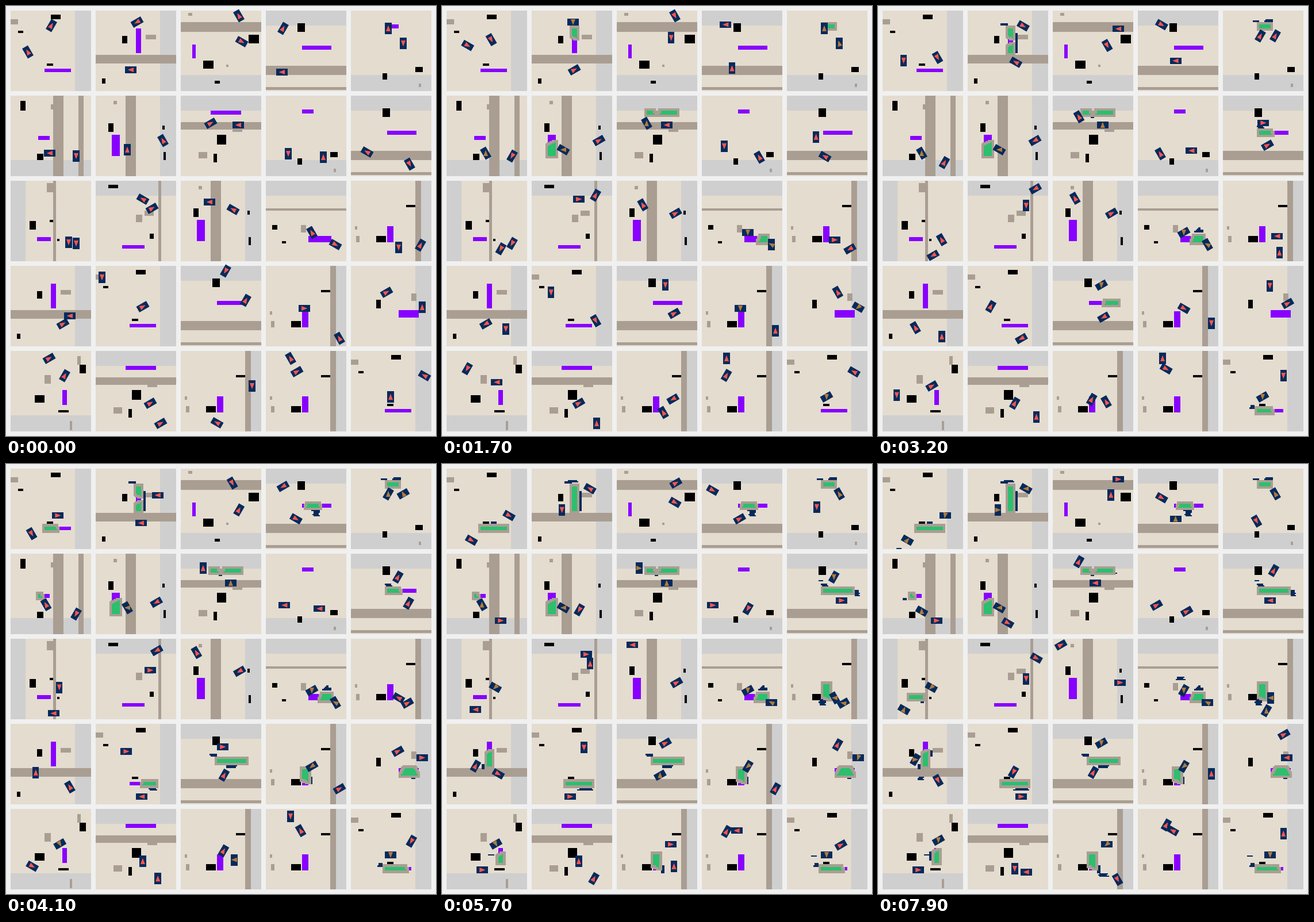
Recreate the animation shown at these times as a matplotlib script. Size 748 px wide and 748 px high, loop 8 s.

```python
import numpy as np
import matplotlib.pyplot as plt
from matplotlib.animation import FuncAnimation
from matplotlib.colors import to_rgb
from matplotlib.patches import Polygon

STAGE, SIDE, GAP, CELLS = 748, 140, 8, 64
CELL = SIDE / CELLS
FRAMES, STEP_MS = 80, 100
BEAT = FRAMES / 6
HOP = 6 * CELL
REACH = 28

FLOOR, GREY, TAN, INK, GOAL = "#e4dccf", "#cfcfcf", "#aa9e93", "#000000", "#8800ff"
NAVY, GREEN, RED, RUST = "#042a5b", "#2bbf6e", "#f9564f", "#b37a3c"

right = (GREY, 51, 0, 64, 64)
bottom = (GREY, 0, 51, 64, 64)
top = (GREY, 0, 0, 64, 12)
left = (GREY, 0, 0, 12, 64)

# Scenes: (colour, x0, y0, x1, y1) in cells, painted in order, goal bar last
shelf = [right, (TAN, 0, 7, 6, 11), (INK, 6, 16, 10, 18), (INK, 32, 3, 40, 7),
         (INK, 29, 42, 34, 44), (GOAL, 27, 46, 48, 49)]
tower = [right, (TAN, 0, 35, 64, 42), (INK, 21, 20, 25, 26), (TAN, 40, 19, 48, 23),
         (INK, 5, 54, 8, 58), (GOAL, 32, 14, 36, 34)]
depot = [bottom, (TAN, 0, 9, 64, 17), (TAN, 6, 2, 9, 4), (INK, 54, 19, 62, 26),
         (INK, 18, 40, 26, 46), (TAN, 36, 43, 38, 45), (INK, 27, 56, 31, 58),
         (GOAL, 9, 27, 12, 38)]
lane = [top, (TAN, 0, 44, 64, 51), (TAN, 0, 61, 64, 63), (INK, 25, 10, 31, 17),
        (GOAL, 29, 28, 52, 31)]
hall = [bottom, (INK, 51, 45, 57, 49), (INK, 25, 50, 29, 55), (TAN, 54, 58, 56, 61),
        (GOAL, 29, 11, 38, 14)]
twin = [bottom, (TAN, 34, 0, 42, 64), (TAN, 54, 0, 58, 64), (INK, 8, 4, 12, 12),
        (TAN, 32, 7, 34, 11), (INK, 21, 46, 26, 51), (GOAL, 22, 32, 31, 35)]
aisle = [right, (TAN, 24, 0, 32, 64), (TAN, 14, 4, 17, 7), (INK, 10, 22, 14, 29),
         (INK, 53, 24, 55, 27), (INK, 54, 45, 56, 51), (GOAL, 13, 31, 19, 48)]
rail = [top, (TAN, 0, 21, 64, 27), (TAN, 41, 27, 49, 29), (INK, 29, 31, 36, 39),
        (TAN, 14, 45, 21, 50), (INK, 26, 46, 29, 53), (GOAL, 24, 12, 48, 15)]
west = [left, (TAN, 34, 0, 36, 64), (TAN, 29, 2, 34, 9), (INK, 15, 32, 20, 39),
        (INK, 31, 31, 34, 33), (INK, 37, 46, 39, 48), (GOAL, 21, 45, 32, 48)]
loft = [top, (TAN, 50, 0, 52, 64), (INK, 10, 3, 18, 6), (TAN, 39, 24, 46, 28),
        (TAN, 32, 27, 37, 33), (INK, 43, 42, 46, 46), (GOAL, 21, 51, 39, 54)]
plain = [top, (TAN, 0, 22, 64, 24), (INK, 5, 35, 9, 39), (TAN, 28, 35, 32, 41),
         (INK, 13, 48, 16, 50), (GOAL, 34, 44, 52, 49)]
east = [(GREY, 56, 0, 64, 64), (TAN, 51, 0, 56, 64), (INK, 44, 19, 51, 21),
        (TAN, 3, 36, 5, 39), (TAN, 4, 44, 7, 49), (INK, 20, 44, 28, 49),
        (GOAL, 29, 36, 34, 49)]
bay = [right, (TAN, 48, 22, 52, 28), (INK, 20, 27, 24, 34), (GOAL, 38, 35, 54, 41)]
yard = [bottom, (TAN, 53, 4, 56, 11), (INK, 55, 11, 60, 18), (TAN, 27, 19, 32, 26),
        (INK, 19, 35, 27, 41), (INK, 38, 47, 46, 49), (TAN, 47, 56, 49, 63),
        (GOAL, 41, 31, 45, 43)]

fig = plt.figure(figsize=(STAGE / 100, STAGE / 100), dpi=100, facecolor="#f0f0f0")
ax = fig.add_axes([0, 0, 1, 1])
ax.axis("off")
panels, robots = [], []


def fill(grid, colour, x0, y0, x1, y1):
    grid[y0:y1, x0:x1] = to_rgb(colour)


def smear(grid, x, y, w, h):
    """A patch with ragged row ends."""
    rng = np.random.default_rng(x + y)
    for row in range(y, y + h):
        a, b = rng.integers(0, 1 + w // 4, 2)
        fill(grid, NAVY, x + a, row, x + w - b, row + 1)


def cleaned(goal, lo, hi):
    """Mask of the share lo..hi of the bar's length; open ends are slanted."""
    x0, y0, x1, y1 = goal
    wide = x1 - x0 > y1 - y0
    length, rows = (x1 - x0, y1 - y0) if wide else (y1 - y0, x1 - x0)
    bar = np.zeros((rows, length), bool)
    for i in range(rows):
        slant = (rows - i) // 2
        a = round(lo * length) + slant * (lo > 0)
        b = round(hi * length) - slant * (hi < 1)
        bar[i, a:b] = True
    mask = np.zeros((CELLS, CELLS), bool)
    mask[y0:y1, x0:x1] = bar if wide else bar.T
    return mask


def paint(scene, done, spots, t):
    grid = np.empty((CELLS, CELLS, 3))
    grid[:] = to_rgb(FLOOR)
    for item in scene:
        fill(grid, *item)
    for start, *spot in spots:
        if start <= t:
            smear(grid, *spot)
    mask = np.zeros((CELLS, CELLS), bool)
    for start, lo, hi in done:
        if start <= t:
            mask |= cleaned(scene[-1][1:], lo, hi)
    for y, x in np.argwhere(mask):
        fill(grid, TAN, x - 2, y - 2, x + 3, y + 3)
    grid[mask] = to_rgb(GREEN)
    return grid


def walk(x, y, hour, *beats):
    """Key poses of a robot. Each beat is a heading in clock hours, or several:
    positive hops that way, negative only turns there."""
    keys = [(0, x, y, hour, False)]
    for i, beat in enumerate(beats):
        moves = beat if isinstance(beat, tuple) else (beat,)
        for j, move in enumerate(moves, 1):
            hour = abs(move)
            if move > 0:
                x += HOP * np.sin(hour * np.pi / 6)
                y -= HOP * np.cos(hour * np.pi / 6)
            keys.append(((i + j / (len(moves) + 1)) * BEAT, x, y, hour, move < 0))
    return keys


def panel(scene, one, two, done=(), spots=()):
    """done: (step, from, to) shares of the goal; spots: (step, x, y, w, h)."""
    row, col = divmod(len(panels), 5)
    x, y = (GAP + i * (SIDE + GAP) for i in (col, row))
    image = ax.imshow(paint(scene, done, spots, 0), interpolation="nearest",
                      extent=(x, x + SIDE, y + SIDE, y), zorder=1)
    panels.append((image, scene, done, spots))
    goal = np.array(scene[-1][1:]) * CELL + (x, y, x, y)
    for route in (one, two):
        body = Polygon([(0, 0)] * 4, fc=NAVY, lw=0, zorder=2)
        arrow = Polygon([(0, 0)] * 3, lw=0, zorder=3)
        ax.add_patch(body)
        ax.add_patch(arrow)
        robots.append((walk(*route), goal, body, arrow))


panel(shelf, (79, 34, 1, 6, (5, 6, 5), (4, 9), (3, 3), -4, -3),
      (38, 80, 11, 1, (4, 6), (8, 6, 6), 5, -4, -4),
      [(36, 0, .5), (48, 0, 1)], [(48, 34, 42, 8, 2), (62, 10, 63, 5, 1)])
panel(tower, (228, 28, 8, -3, 3, (4, 4, 6), 11, -10, -4),
      (217, 111, 9, 3, (2, 2), (9, 10, 5), (9, 11, 11), -6, -12),
      [(17, 0, .4), (30, .65, 1), (48, 0, 1)],
      [(30, 26, 10, 6, 2), (30, 38, 18, 2, 16), (48, 29, 9, 8, 2)])
panel(depot, (405, 17, 11, -11, 5, (5, 10, 9), 3, 2, -3),
      (410, 62, 4, 10, 6, 5, 12, -4, 12))
panel(lane, (482, 39, 1, 2, 9, (3, 8), 8, 4, 4),
      (480, 115, 9, (2, 3), (12, 3), 9, 3, -2, -3),
      [(34, .13, .61)], [(34, 36, 33, 8, 5)])
panel(hall, (665, 39, 12, -12, 6, -1, (7, 7), 6, 5),
      (691, 65, 6, -6, 12, -1, -2, -11, -11),
      [(17, 0, 1)], [(30, 23, 8, 8, 1), (30, 33, 7, 9, 2)])

panel(twin, (76, 256, 9, -10, -11, 11, -11, 5, -10),
      (122, 261, 6, -8, 7, 1, (7, 9), -3, -3),
      [(34, 0, .33)], [(62, 16, 35, 3, 2)])
panel(aisle, (211, 250, 12, -11, -10, -4, -10, -4, -10),
      (273, 234, 11, -12, -2, 8, (8, 8), (7, 7), -4), [(8, .35, 1)])
panel(rail, (356, 204, 2, -11, -11, (11, 11), -12, -12, 1),
      (404, 207, 9, 9, -9, -9, -9, -3, 9),
      [(7, 0, .25), (7, .42, 1)], [(20, 30, 15, 3, 3), (62, 46, 15, 5, 2)])
panel(hall, (491, 257, 6, 12, 6, 11, 9, (3, 8), 2),
      (552, 263, 12, -11, 11, -9, 9, 7, 2))
panel(lane, (628, 254, 10, (2, 2), (12, 12, 1), (3, 2), -1, 1, -1),
      (702, 275, 5, (9, 10), (10, 12, 10), (4, 2, 4, 2), (1, 8), -3, 9),
      [(32, 0, .43), (49, 0, 1)],
      [(32, 27, 24, 6, 2), (49, 53, 29, 5, 5), (49, 24, 21, 6, 1)])

panel(west, (109, 411, 6, 7, -7, (7, 9), (9, 10), 9, -4),
      (122, 413, 6, -7, -7, (10, 11, 10), -4, -4, -4),
      [(62, 0, 1)], [(62, 30, 49, 3, 2)])
panel(loft, (238, 336, 10, -4, 3, (5, 7), 1, -12, (6, 6)),
      (254, 352, 2, (1, 1), 1, 8, 8, 3, 4))
panel(aisle, (354, 341, 9, (10, 5), -11, (11, 10), 12, 9, -2),
      (395, 354, 10, 4, -2, -2, (8, 3, 6), -2, 3))
panel(plain, (532, 394, 11, -3, -9, -2, -2, -2, -1),
      (573, 415, 4, -2, -12, -11, -11, -3, -3),
      [(8, .6, 1), (18, .5, 1)],
      [(18, 44, 39, 8, 2), (18, 47, 37, 4, 2), (72, 29, 30, 9, 3)])
panel(east, (683, 420, 6, 12, (3, 2), (9, 8), -11, -11, -12),
      (721, 416, 1, 8, 8, 12, -2, (8, 8), -1),
      [(50, 0, .9)], [(50, 25, 48, 6, 5)])

panel(tower, (111, 539, 9, (5, 7), 6, 12, (11, 11), -4, 5),
      (99, 553, 2, 10, (8, 6, 8), (12, 11, 11), 1, 1, -1),
      [(49, .4, 1)],
      [(49, 28, 32, 2, 4), (62, 28, 42, 5, 3), (62, 38, 21, 2, 5)])
panel(shelf, (167, 472, 6, (4, 4), (6, 6, 7), (3, 1, 1), (3, 3, 2), (6, 5), (8, 7)),
      (238, 523, 2, (4, 4), (5, 6, 7), (8, 9), 9, 3, 3),
      [(34, .5, 1), (48, 0, 1)], [(34, 41, 51, 8, 2), (48, 36, 51, 12, 2)])
panel(lane, (382, 461, 7, (6, 5), -6, 8, 2, -2, -2),
      (417, 512, 1, (7, 7), -2, (8, 9), -2, 8, 1),
      [(18, .52, 1), (33, 0, 1)], [(33, 23, 24, 7, 2), (33, 35, 33, 11, 2)])
panel(east, (519, 526, 3, -3, 3, -4, -2, -1, -1),
      (580, 578, 11, 12, 12, 6, -1, -1, (12, 12)),
      [(33, 0, .77)], [(33, 34, 42, 3, 6)])
panel(bay, (662, 498, 2, (3, 3), 11, 6, 1, 1, 2),
      (724, 524, 12, -4, 10, 2, -3, -3, 9),
      [(34, .15, .95)], [(34, 48, 42, 3, 2)])

panel(yard, (75, 613, 2, (9, 8), (7, 8, 6), (6, 6, 5, 5), (4, 3), -3, -3),
      (102, 643, 1, 7, (9, 4), -2, -2, 2, -2),
      [(49, .45, 1), (62, .15, .95)], [(49, 33, 36, 6, 1), (62, 37, 34, 3, 7)])
panel(rail, (251, 691, 2, 9, -2, -1, -12, -12, 6),
      (269, 726, 2, -12, -12, (1, 8), -1, (1, 1), (7, 9)))
panel(east, (428, 661, 6, (7, 7), (9, 5, 10), -11, 5, -12, (5, 5)),
      (367, 725, 10, (2, 1), (11, 11), 1, (1, 3), -3, -3),
      [(49, 0, .85)], [(49, 35, 45, 3, 6), (62, 36, 51, 9, 3)])
panel(east, (495, 613, 11, -1, -12, -12, (6, 6), -1, 1),
      (506, 636, 2, 8, 1, 4, -10, -9, -10))
panel(shelf, (728, 643, 10, 10, 10, (6, 6), 8, 2, 12),
      (669, 680, 12, -2, -2, -2, -3, 3, -3),
      [(19, 0, .55), (33, 0, .8)], [(19, 21, 43, 5, 3), (49, 19, 37, 6, 1)])


def turn(a, b, u):
    """Turn from a to b the short way, one hour at a time."""
    return a + round(((b - a + 6) % 12 - 6) * min(u, 1))


def pose(keys, goal, t):
    """Turn towards the next key, jump on reaching it; work if idle near the goal."""
    i = max(k for k, key in enumerate(keys) if key[0] <= t)
    start, x, y, hour, idle = keys[i]
    if i + 1 < len(keys):
        end, _, _, ahead, _ = keys[i + 1]
        hour = turn(hour, ahead, 1.5 * (t - start) / (end - start))
    dx = np.clip(x, goal[0], goal[2]) - x
    dy = np.clip(y, goal[1], goal[3]) - y
    work = idle and 0 < np.hypot(dx, dy) < REACH
    aim = np.arctan2(dx, -dy) * 6 / np.pi if work else hour
    return x, y, hour, aim, work


def placed(shape, x, y, hour):
    a = hour * np.pi / 6
    fwd, side = np.array([np.sin(a), -np.cos(a)]), np.array([np.cos(a), np.sin(a)])
    return [np.array([x, y]) + f * fwd + s * side for f, s in shape]


BODY = [(10, 5.7), (10, -5.7), (-10, -5.7), (-10, 5.7)]
ARROW = [(5.4, 0), (-5, 4), (-5, -4)]


def draw(t):
    for image, *world in panels:
        if world[1]:
            image.set_data(paint(*world, t))
    for keys, goal, body, arrow in robots:
        x, y, hour, aim, work = pose(keys, goal, t)
        body.set_xy(placed(BODY, x, y, hour))
        arrow.set_xy(placed(ARROW, x, y, aim))
        arrow.set_facecolor(RUST if work else RED)
    return [p[0] for p in panels] + [part for r in robots for part in r[2:]]


ax.set_xlim(0, STAGE)
ax.set_ylim(STAGE, 0)
ax.set_aspect("auto")
anim = FuncAnimation(fig, draw, frames=FRAMES, interval=STEP_MS, repeat=True,
                     repeat_delay=0)
plt.show()
```
